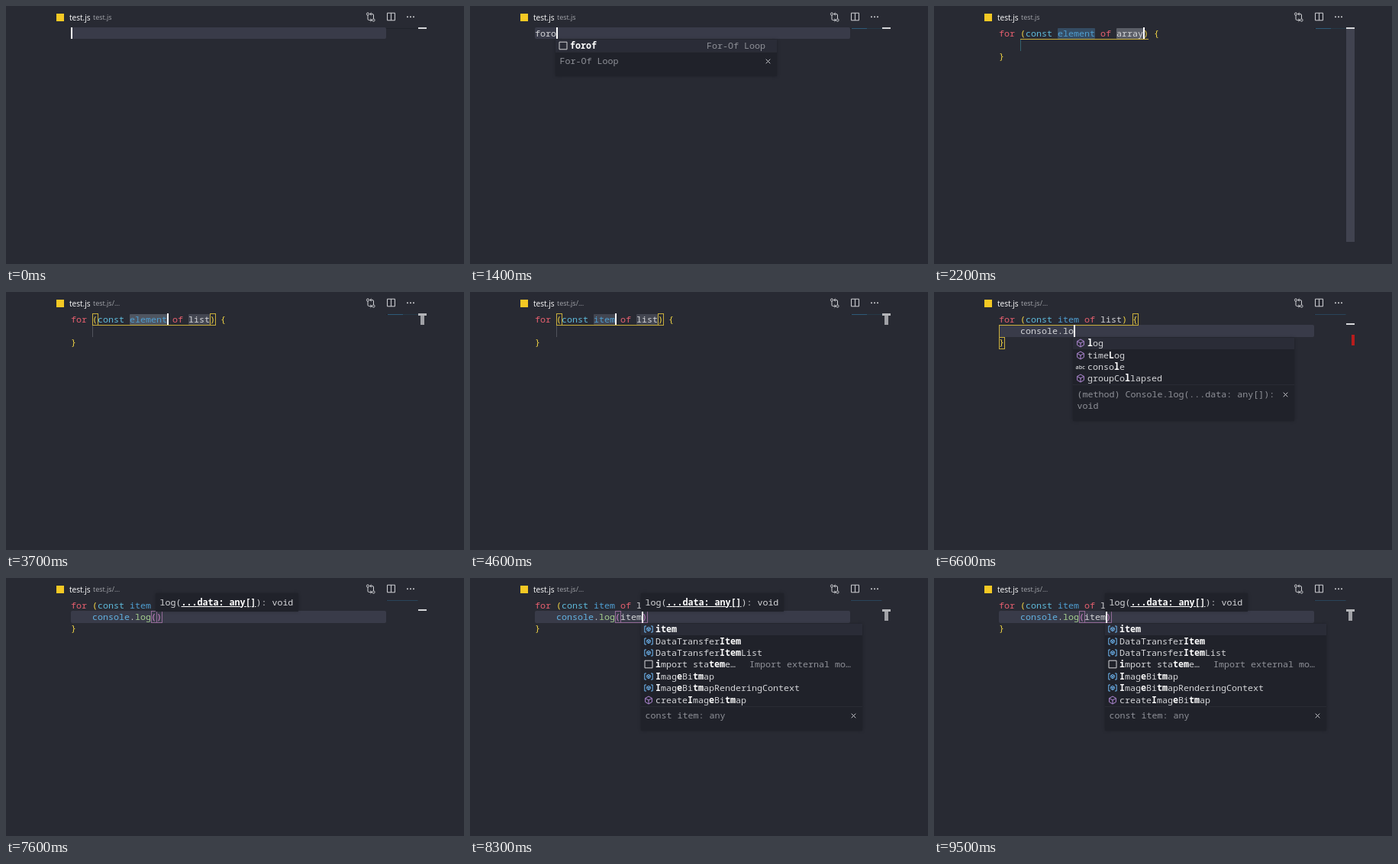
These frames come from a looping animation (600 px wide and 338 px high, 9600 ms). An HTML page:

```html
<!DOCTYPE html>
<html lang="en">
<head>
<meta charset="utf-8">
<title>Snippet typing</title>
<style>
  html, body { margin: 0; width: 100%; height: 100%; overflow: hidden; background: #282a33; }
  #stage { position: relative; width: 600px; height: 338px; overflow: hidden; background: #282a33; }
  #stage div, #stage svg { position: absolute; }
  .code { margin-top: -.5px; font: 11.667px/15.4px "Noto Sans Mono", monospace; white-space: pre; color: #d5d6d9; font-variant-ligatures: none; }
  .ui { font-family: "Open Sans", "Noto Sans", sans-serif; white-space: pre; line-height: 14px; top: 8px; }
  .kw { color: #e8606f; }
  .decl { color: #5fbbdc; }
  .name { color: #4f9fd2; }
  .obj { color: #62b2e2; }
  .gold { color: #f2d545; }
  .pink { color: #cf86cb; }
  .fn { color: #a5cf8e; }
  .pop { background: #20222a; box-shadow: 0 0 4px rgba(0, 0, 0, .25); }
  .pop b { color: #fff; }
  .dim { color: #8f9198; }
</style>
</head>
<body>
<div id="stage">
  <div style="left:66px;top:9.5px;width:10px;height:10px;background:#f5c924"></div>
  <div class="ui" style="left:83px;font-size:10.1px;color:#fff">test.js</div>
  <div class="ui" id="crumb" style="left:114px;font-size:9px;color:#a2a4aa"></div>
  <svg width="600" height="28" fill="none" stroke="#d0d1d5" stroke-width="1">
    <circle cx="474" cy="10.5" r="1.6"/><circle cx="481.5" cy="18.5" r="1.6"/>
    <path d="M474 12.2V17q0 1.5 1.5 1.5H479M477.3 16.5l2 2-2 2M481.5 16.8V12q0-1.5-1.5-1.5H477M478.8 8.5l-2 2 2 2"/>
    <path d="M499.5 9.2h10v9.6h-10zM504.5 9.2v9.6"/>
    <g fill="#d0d1d5" stroke="none"><circle cx="526" cy="14.3" r="1"/><circle cx="530" cy="14.3" r="1"/><circle cx="534" cy="14.3" r="1"/></g>
  </svg>
  <div id="view"></div>
</div>
<script>
const LOOP = 9600, CW = 7, LH = 15.4, X0 = 85, Y0 = 28;
const colX = col => X0 + col * CW;
const rowY = row => Y0 + row * LH;

// Suggestion rows: icon letter, label with *matched* parts, optional hint
const lists = {
  f: ["s *f*or|For Loop", "s *f*oreach|For-Each Loop", "s *f*orin|For-In Loop", "s *f*orof|For-Of Loop",
      "s *f*unction|Function Statement", "v *f*alse", "v *f*inally", "m *f*etch", "m *f*ocus", "v *f*rames", "v *F*ile", "v *F*ormData"],
  fo: ["s *fo*r|For Loop", "s *fo*reach|For-Each Loop", "s *fo*rin|For-In Loop", "s *fo*rof|For-Of Loop",
       "m *fo*cus", "v *Fo*ntFace", "v *Fo*rmData"],
  for: ["s *for*|For Loop", "s *for*each|For-Each Loop", "s *for*in|For-In Loop", "s *for*of|For-Of Loop", "v *For*mData"],
  forof: ["s *forof*|For-Of Loop"],
  co: ["v *co*nsole", "v *co*nst", "v *co*ntinue", "m *co*nfirm", "v *Co*mment", "v *Co*mmentEvent",
       "v *Co*nstantSourceNode", "v *Co*nvolverNode", "v *Co*untQueuingStrategy", "m de*co*deURI", "m en*co*deURI", "v TextEn*co*der"],
  con: ["v *con*sole", "v *con*st", "v *con*tinue", "m *con*firm", "v *Con*stantSourceNode", "v *Con*volverNode"],
  cons: ["v *cons*ole", "v *cons*t", "v *Cons*tantSourceNode"],
  members: ["m assert", "m clear", "m count", "m countReset", "m debug", "m dir", "m dirxml", "m error", "m group", "m groupCollapsed", "m info", "m log"],
  lo: ["m *l*og", "m time*L*og", "t conso*l*e", "m groupCo*l*lapsed"],
  log: ["m *log*", "m time*Log*"],
  item: ["v *item*", "v DataTransfer*Item*", "v DataTransfer*Item*List", "s *i*mport sta*tem*e…|Import external mo…",
         "v *I*mag*e*Bi*tm*ap", "v *I*mag*e*Bi*tm*apRenderingContext", "m create*I*mag*e*Bi*tm*ap"]
};

const forLine = (el, arr) => `for (const ${el} of ${arr}) {`;
const consoleInfo = ["var console: Console"];
const logInfo = ["(method) Console.log(...data: any[]):", "void"];
const itemInfo = ["const item: any"];

// Steps: time, first line, body line, cursor row, cursor column, extras
const steps = [[0, "", null, 0, 0, {}]];
const add = (t, head, body, row, col, extra = {}) => steps.push([t, head, body, row, col, extra]);
const typeHead = (t, s, list, info) => add(t, s, null, 0, s.length, { list, info });
const typeBody = (t, s, extra, back = 0) => add(t, forLine("item", "list"), s, 1, 4 + s.length - back, extra);

typeHead(700, "f");
typeHead(800, "f", "f", ["For Loop"]);
typeHead(1000, "fo", "fo", ["For Loop"]);
typeHead(1100, "for", "for", ["For Loop"]);
typeHead(1300, "foro", "forof", ["For-Of Loop"]);
typeHead(1500, "forof", "forof", ["For-Of Loop"]);
add(1800, forLine("element", "array"), "", 0, 27, { marks: [[11, 7, "#354c63"], [22, 5, "#5b5e67"]], slider: true });
["l", "li", "lis", "list"].forEach((s, i) =>
  add(2700 + i * 100, forLine("element", s), "", 0, 22 + s.length, { marks: [[11, 7, "#354c63"], [22, s.length, "#434651"]] }));
add(3300, forLine("element", "list"), "", 0, 18, { marks: [[11, 7, "#4f5560"], [22, 4, "#434651"]] });
["i", "it", "ite", "item"].forEach((s, i) =>
  add(4000 + i * 100, forLine(s, "list"), "", 0, 11 + s.length, { marks: [[11, s.length, "#434651"], [15 + s.length, 4, "#434651"]] }));
typeBody(4700, "");
typeBody(5400, "c");
typeBody(5700, "co", { list: "co", info: consoleInfo });
typeBody(5800, "con", { list: "con", info: consoleInfo });
typeBody(6000, "cons", { list: "cons", info: consoleInfo });
typeBody(6200, "console");
typeBody(6300, "console.", { list: "members", info: ["(method) Console.assert()"], error: true });
typeBody(6500, "console.l", { list: "lo", info: logInfo, error: true });
typeBody(6600, "console.lo", { list: "lo", info: logInfo, error: true });
typeBody(6700, "console.log", { list: "log", info: logInfo, error: true });
typeBody(7000, "console.log");
typeBody(7100, "console.log()", { sig: true }, 1);
["i", "it", "ite", "item"].forEach((s, i) =>
  typeBody([7700, 7900, 8000, 8200][i], `console.log(${s})`, { sig: true, list: "item", info: itemInfo }, 1));

const rect = (x, y, w, h, style) => `<div style="left:${x}px;top:${y}px;width:${w}px;height:${h}px;${style}"></div>`;
const fill = (x, y, w, h, color) => rect(x, y, w, h, `background:${color}`);
const text = (x, y, html) => `<div class="code" style="left:${x}px;top:${y}px">${html}</div>`;
const span = (cls, s) => `<span class="${cls}">${s}</span>`;
const frame = (row, col, color) =>
  rect(colX(col) - .5, rowY(row) - .3, CW - 1, LH - 1.2, `border:1px solid ${color}`);

function paintHead(s) {
  return s.replace(/\b(for|of|const)\b|[(){}]/g, m =>
    m === "const" ? span("decl", m) : /\w/.test(m) ? span("kw", m) : span("gold", m))
    .replace(/(const<\/span> )(\w+)/, (_, a, b) => a + span("name", b));
}
function paintBody(s) {
  return s.replace(/console(?=\.log\()|log(?=\()|[()]/g, m =>
    span({ console: "obj", log: "fn" }[m] || "pink", m));
}

const cube = (x, y, r, c) => {
  const w = r * .87, h = r / 2;
  return `<path d="M${x} ${y - r}l${w} ${h}v${r}l${-w} ${h}l${-w} ${-h}v${-r}zM${x - w} ${y - h}L${x} ${y}l${w} ${-h}M${x} ${y}v${r}" stroke="${c}" fill="none"/>`;
};
const icons = {
  m: cube(6, 6, 5, "#b38ad8"),
  v: `<path d="M3 2H.8v8H3M9 2h2.2v8H9" fill="none" stroke="#6fb7f2"/>` + cube(6, 6, 2.6, "#6fb7f2"),
  s: `<path d="M1 1.2h10v9.6H1z" fill="none" stroke="#d5d6d9"/>`,
  t: `<text x="-.5" y="9" font-size="7.2" font-weight="600" fill="#d5d6d9" font-family="Open Sans, sans-serif">abc</text>`
};

function popup(x, y, rows, info) {
  const w = 290, top = rows.length * LH;
  let out = fill(0, 0, w, LH, "#2a2c37");
  rows.forEach((row, i) => {
    const [label, hint] = row.slice(2).split("|");
    out += `<svg style="left:4px;top:${i * LH + 1.4}px;overflow:visible" width="12" height="12">${icons[row[0]]}</svg>`;
    out += text(19, i * LH, label.replace(/\*(.+?)\*/g, "<b>$1</b>"));
    if (hint) out += text(w - 15 - hint.length * CW, i * LH, span("dim", hint));
  });
  out += fill(0, top, w, 1, "#292b34");
  info.forEach((line, i) => out += text(5.5, top + 5 + i * LH, span("dim", line)));
  out += `<svg style="left:274.5px;top:${top + 9.5}px" width="7" height="7"><path d="M.7.7l5.6 5.6M6.3.7L.7 6.3" stroke="#c5c6ca"/></svg>`;
  return `<div class="pop" style="left:${x}px;top:${y}px;width:${w}px;height:${top + 17 + info.length * LH}px">${out}</div>`;
}

function ruler(row, head, body, extra) {
  const stem = extra.list === "item" || (extra.marks && !extra.slider);
  let out = fill(498, 28.5, 42, 1, "#20232b");
  if (head) out += fill(500, 28.5, 20, 1.2, "#2d5a78") + fill(520, 28.5, 20, 1, "#253846");
  if (body) out += fill(499, 29, 40, 1.2, "#29445a");
  if (extra.slider) out += fill(540, 28, 11, 281, "#414350");
  const y = row ? 41.3 : 28;
  out += stem ? fill(540, y, 11, 3, "#b4b5b9") + fill(543, y + 3, 5, 11.5, "#a0a1a6")
              : fill(540, y, 11, row ? 1.6 : 2, "#d6d7da");
  if (extra.error) out += fill(547, 56, 4, 14, "#b81c1c");
  return out;
}

function brackets(row, head, body, extra) {
  const gold = "#c9ae3c", pink = "#936b98";
  if (body === null) return "";
  if (row === 0) {
    const close = head.indexOf(")");
    const guide = fill(113, 43.5, 1, 15.5, extra.slider ? "#34616f" : "#50535c");
    const line = fill(113, 43, (close - 3) * CW, 1, gold);
    return guide + line + (extra.slider ? "" : frame(0, 4, gold) + frame(0, close, gold));
  }
  const open = body.indexOf("(");
  if (open >= 0) {
    const close = body.length - 1;
    return frame(1, open + 4, pink) + frame(1, close + 4, pink) +
      fill(colX(open + 4), rowY(2) - .8, (close - open + 1) * CW, 1, pink);
  }
  const brace = head.length - 1;
  return fill(X0, 43, brace * CW, 1, gold) + fill(X0, 43, 1, 16, gold) + frame(0, brace, gold) + frame(2, 0, gold);
}

function scene([, head, body, row, col, extra], cursorOn) {
  const x = colX(col);
  let out = "";
  if (!extra.marks) out += rect(X0, rowY(row), 413, LH, "background:#393b49;border-radius:2px");
  for (const [c, n, color] of extra.marks || []) out += rect(colX(c), Y0 + .5, n * CW, 14.5, `background:${color};border-radius:1px`);
  out += brackets(row, head, body, extra) + text(X0, rowY(0), paintHead(head));
  if (body !== null) out += text(colX(4), rowY(1), paintBody(body)) + text(X0, rowY(2), span("gold", "}"));
  out += ruler(row, head, body, extra);
  if (cursorOn) out += fill(x, rowY(row), 1.7, LH, "#fff");
  if (extra.sig) {
    out += `<div class="pop" style="left:${x - 1}px;top:20px;width:187px;height:24px">` +
      text(5.5, 4, `log(<b style="text-decoration:underline">...data: any[]</b>): void`) + "</div>";
  }
  if (extra.list) out += popup(x - 1, rowY(row + 1) + 1, lists[extra.list], extra.info);
  return out;
}

const view = document.getElementById("view"), crumb = document.getElementById("crumb");
let shown = "";
function draw(now) {
  const t = now % LOOP;
  const i = steps.findLastIndex(s => s[0] <= t);
  const on = Math.floor((t - steps[i][0]) / 500) % 2 === 0;
  const key = `${i} ${on}`;
  if (key !== shown) {
    shown = key;
    view.innerHTML = scene(steps[i], on);
    crumb.textContent = t < 2700 ? "test.js" : "test.js/...";
  }
}
const start = performance.now();
function tick() {
  draw(performance.now() - start);
  requestAnimationFrame(tick);
}
tick();
</script>
</body>
</html>
```
